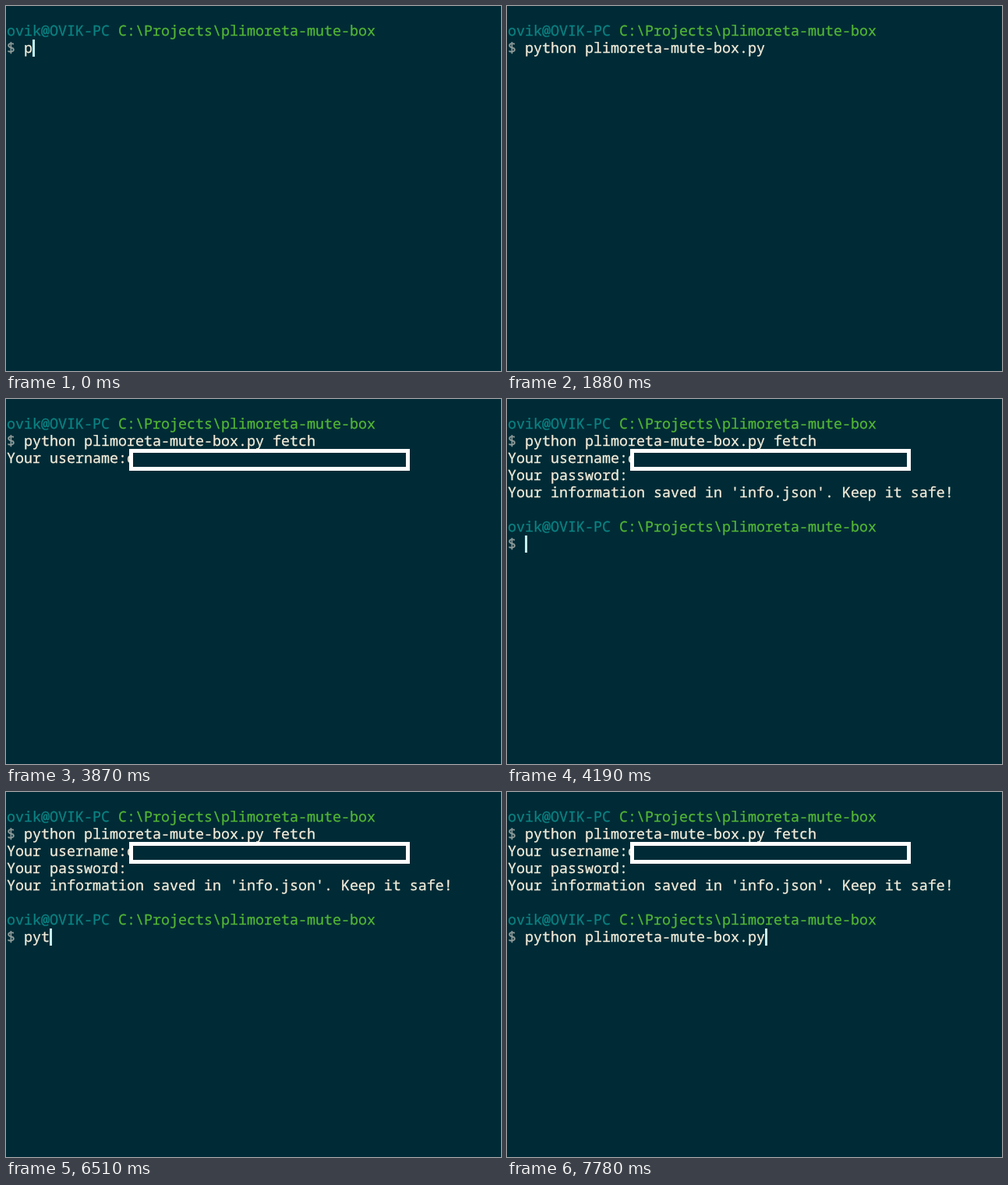
Animation of 635 by 468 pixels, one loop 8 s. Source, as an HTML page:

```html
<!DOCTYPE html>
<html lang="en">
<head>
<meta charset="utf-8">
<title>Terminal session</title>
<style>
  html, body { margin: 0; width: 100%; height: 100%; overflow: hidden; background: #002b36; }
  svg { display: block; width: 635px; height: 468px; }
  text {
    font: 18.3333px "Noto Sans Mono", "DejaVu Sans Mono", monospace;
    white-space: pre;
    text-rendering: geometricPrecision;
    font-variant-ligatures: none;
    stroke-width: 0.3px;
  }
</style>
</head>
<body>
<svg id="stage" viewBox="0 0 635 468" xmlns="http://www.w3.org/2000/svg"></svg>
<script>
const LOOP = 8000;
const CELL = 11, ROW = 22, LEFT = 1, TOP = 21, BASELINE = 17;
const COLORS = { back: "#002b36", user: "#0b8282", path: "#52b435", sign: "#939f9d", text: "#f2ecda", cursor: "#c3f0f4" };
const SCRIPT = "plimoreta-mute-box";
const COMMAND = `python ${SCRIPT}.py`;
const FIRST = 1, NAME = 2, PASSWORD = 3, INFO = 4, BLANK = 5, SECOND = 7;
const NAME_AT = 3870, PROMPT_AT = 4190;

const stage = document.getElementById("stage");
const colX = col => LEFT + col * CELL;
const rowY = row => TOP + row * ROW;

function make(tag, attrs, parent = stage) {
  const node = document.createElementNS("http://www.w3.org/2000/svg", tag);
  for (const key in attrs) node.setAttribute(key, attrs[key]);
  return parent.appendChild(node);
}

// The thin stroke gives the slightly heavy terminal weight.
function write(row, col, color, content = "", parent = stage) {
  const node = make("text", { x: colX(col), y: rowY(row) + BASELINE, fill: color, stroke: color }, parent);
  node.textContent = content;
  return node;
}

function makePrompt(row) {
  const group = make("g", {});
  write(row, 0, COLORS.user, "ovik@OVIK-PC", group);
  write(row, 13, COLORS.path, `C:\\Projects\\${SCRIPT}`, group);
  write(row + 1, 0, COLORS.sign, "$", group);
  return group;
}

make("rect", { width: 635, height: 468, fill: COLORS.back });
makePrompt(0);
const secondPrompt = makePrompt(6);

const startCol = row => row === FIRST || row === SECOND ? 2 : 0;
const lines = {};
for (const row of [FIRST, NAME, PASSWORD, INFO, BLANK, SECOND]) {
  lines[row] = write(row, startCol(row), COLORS.text);
}
const nameBox = make("rect", {
  x: 160.5, y: 66.5, width: 355, height: 23,
  fill: COLORS.back, stroke: "#fff", "stroke-width": 5
});
const cursor = make("rect", { width: 3, height: ROW, fill: COLORS.cursor });

// Each step sets one line and puts the cursor at its end.
const steps = [];
const show = (at, row, text, lit = true) => steps.push({ at, row, text, lit });

function type(row, text, from, count, start, end) {
  for (let i = 0; i < count; i++) {
    const at = start + (end - start) * i / (count - 1);
    show(at, row, text.slice(0, from + i + 1));
  }
}

show(0, FIRST, "p");
type(FIRST, COMMAND, 1, 7, 80, 940);
type(FIRST, COMMAND, 8, 2, 1170, 1295);
show(1420, FIRST, COMMAND);
show(1880, FIRST, COMMAND, false);
type(FIRST, COMMAND + " fetch", COMMAND.length, 5, 2260, 3030);
show(3180, FIRST, COMMAND + " fetch");
show(3340, NAME, "");
show(3570, NAME, "Your username:");
show(NAME_AT, NAME, "Your username:o", false);
show(3950, PASSWORD, "Your password:");
show(4070, INFO, "Your information saved in 'info.json'. Keep it safe!");
show(4070, BLANK, "");
show(PROMPT_AT, SECOND, "");
show(4740, SECOND, "", false);
show(5270, SECOND, "");
show(5810, SECOND, "", false);
type(SECOND, COMMAND, 0, 3, 6130, 6510);
type(SECOND, COMMAND, 3, 4, 6680, 7000);
type(SECOND, COMMAND, 7, 3, 7380, 7647);
show(7780, SECOND, COMMAND);

const setVisible = (node, on) => node.setAttribute("visibility", on ? "visible" : "hidden");

function render(t) {
  const shown = {};
  let last;
  for (const step of steps) {
    if (step.at > t + 0.01) break;
    shown[step.row] = step.text;
    last = step;
  }
  for (const row in lines) {
    const text = shown[row] || "";
    if (lines[row].textContent !== text) lines[row].textContent = text;
  }
  setVisible(nameBox, t >= NAME_AT);
  setVisible(secondPrompt, t >= PROMPT_AT);
  setVisible(cursor, last.lit);
  cursor.setAttribute("x", colX(startCol(last.row) + last.text.length));
  cursor.setAttribute("y", rowY(last.row));
}

function tick() {
  render(performance.now() % LOOP);
  requestAnimationFrame(tick);
}
tick();
</script>
</body>
</html>
```
